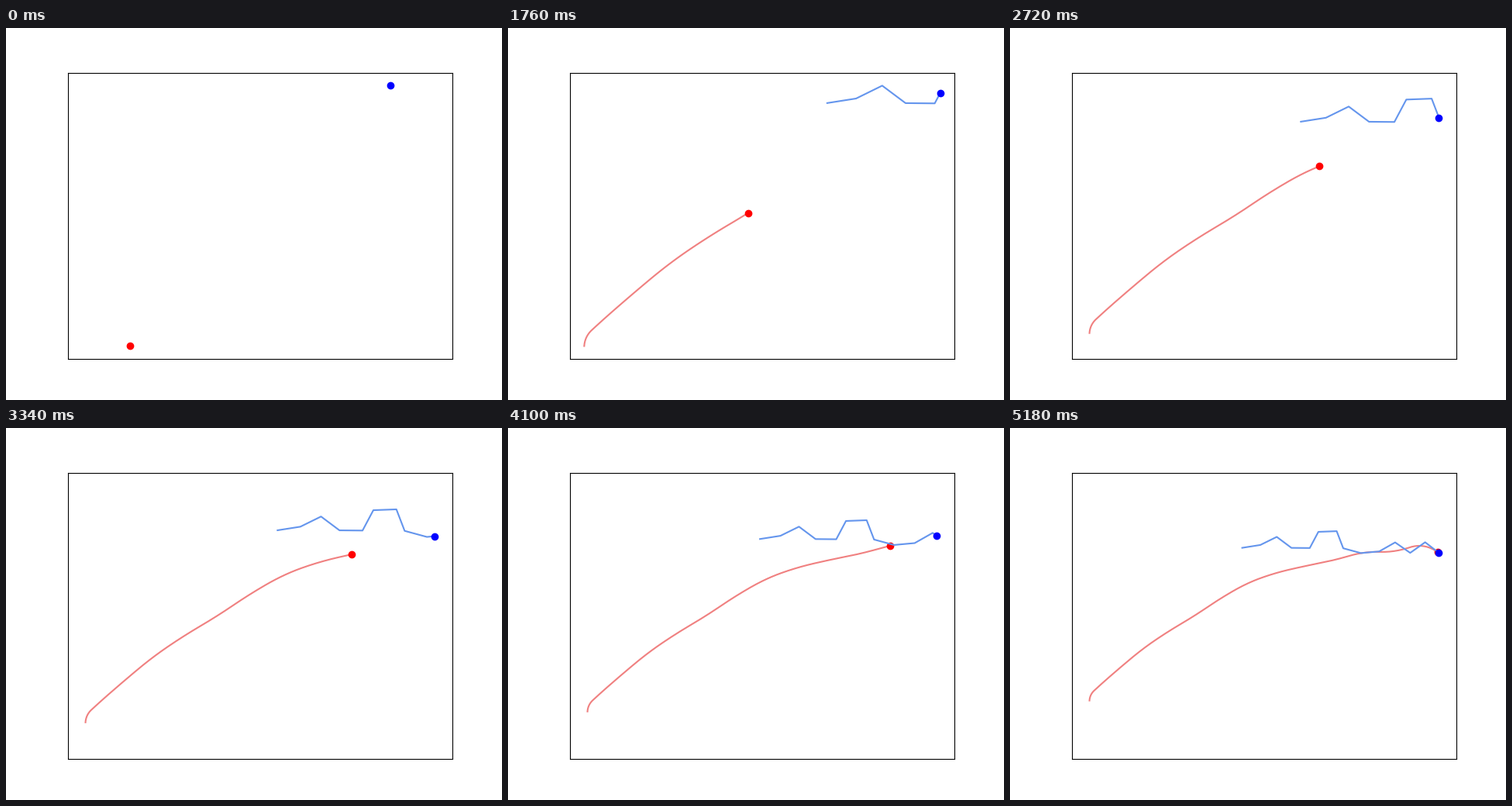
These frames come from a looping animation (640x480 px, 5200 ms). A matplotlib script:

```python
import numpy as np
import matplotlib.pyplot as plt
from matplotlib.animation import FuncAnimation

FRAMES = 260
LEG = 20  # steps the runner keeps one heading
RUN_SPEED, CHASE_SPEED = 0.6, 1.0
MAX_TURN = np.radians(6)
HEADINGS = np.radians([8.9, 26.2, -36.8, -0.5, 62, 2.1, -69,
                       -15.2, 5.2, 29.5, -34.8, 35.4, -37.6])


def runner_path():
    angles = np.repeat(HEADINGS, LEG)[:FRAMES - 1]
    steps = RUN_SPEED * np.column_stack([np.cos(angles), np.sin(angles)])
    return np.vstack([[100, 100], [100, 100] + np.cumsum(steps, axis=0)])


def chaser_path(prey):
    """Pure pursuit with a limited turn per step."""
    path = [np.zeros(2)]
    heading = np.pi / 2
    for goal in prey[1:]:
        dx, dy = goal - path[-1]
        error = (np.arctan2(dy, dx) - heading + np.pi) % (2 * np.pi) - np.pi
        heading += np.clip(error, -MAX_TURN, MAX_TURN)
        step = min(CHASE_SPEED, np.hypot(dx, dy))
        path.append(path[-1] + step * np.array([np.cos(heading), np.sin(heading)]))
    return np.array(path)


runner = runner_path()
chaser = chaser_path(runner)

fig, ax = plt.subplots(figsize=(6.4, 4.8), dpi=100)
ax.set_aspect("equal", adjustable="datalim")
ax.set_xticks([])
ax.set_yticks([])


def make_pair(trail_color, dot_color):
    trail, = ax.plot([], [], color=trail_color)
    dot, = ax.plot([], [], "o", color=dot_color)
    return trail, dot


actors = [(chaser, *make_pair("lightcoral", "red")),
          (runner, *make_pair("cornflowerblue", "blue"))]


def update(i):
    for path, trail, dot in actors:
        trail.set_data(*path[:i + 1].T)
        dot.set_data(*path[i:i + 1].T)
    ax.relim()
    ax.autoscale_view()
    return [artist for _, *pair in actors for artist in pair]


anim = FuncAnimation(fig, update, frames=FRAMES, interval=20, repeat=True,
                     repeat_delay=0, blit=False)
plt.show()
```
